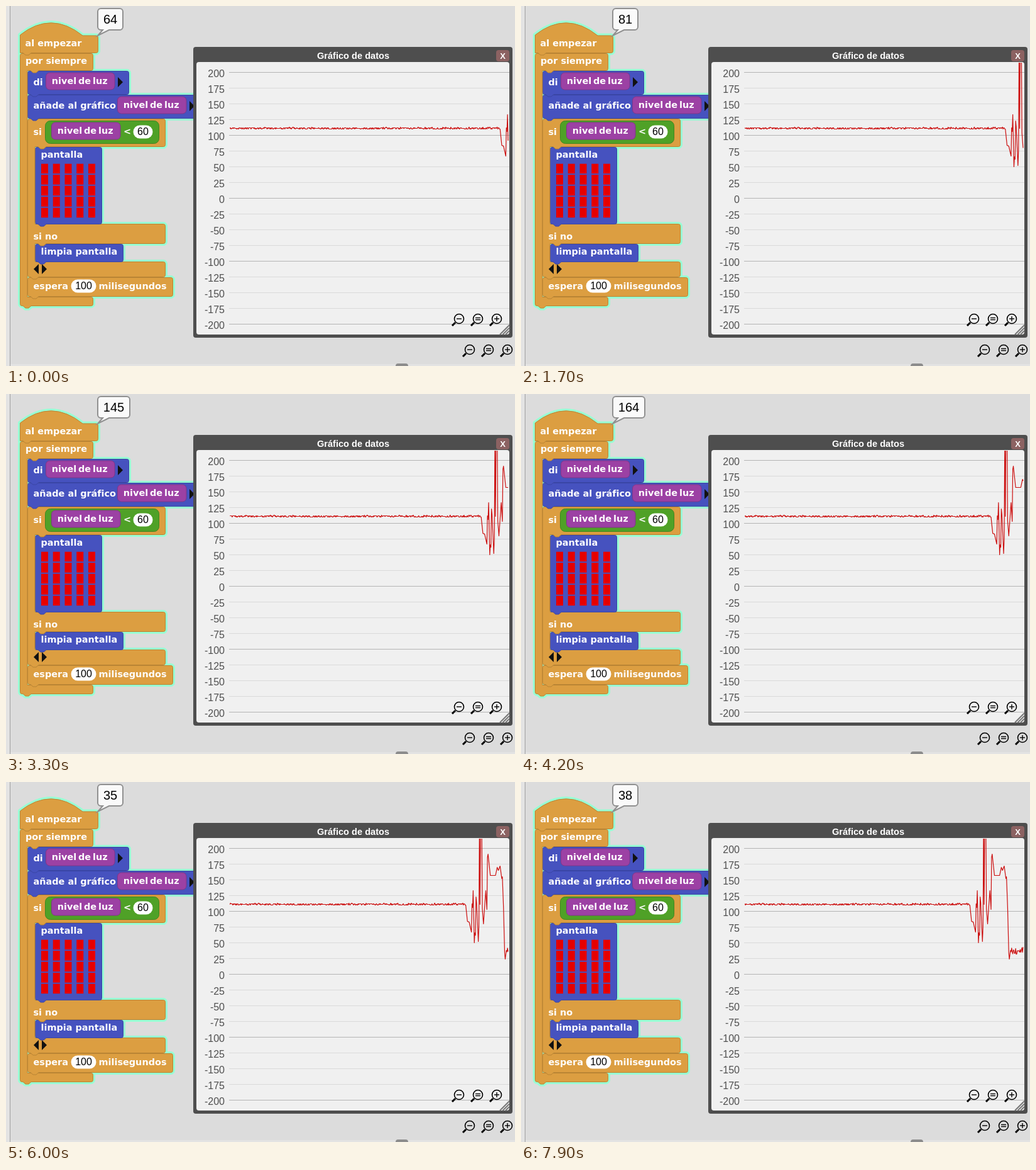
These frames come from a looping animation (810x572 px, 8 s). An HTML page with a canvas:

```html
<!DOCTYPE html>
<html lang="es">
<head>
<meta charset="utf-8">
<title>Gráfico de datos</title>
<style>
html, body { margin: 0; width: 100%; height: 100%; overflow: hidden; background: #dcdcdc; }
canvas { display: block; }
</style>
</head>
<body>
<canvas id="stage" width="810" height="572"></canvas>
<script>
const ctx = document.getElementById('stage').getContext('2d');
const LOOP = 8000, STEP = 100, DX = 0.911;
const ORANGE = ['#dc9e41', '#b98434'], BLUE = ['#4652bf', '#3a46a5'];
const PURPLE = ['#9c41a4', '#803588'], GREEN = ['#4fa127', '#418520'];
const GLOW = '#98ffd4';
const SANS = '"Liberation Sans", Arial, sans-serif';
const LABEL = 'bold 14.45px "DejaVu Sans", sans-serif';
const PLAIN = '16px ' + SANS;

// Turning points of the light level: [step, value].
const level = [
  [-14, 110], [-11, 84], [-8, 83], [-4, 67], [-3, 112], [-2, 106], [-1, 133],
  [1, 50], [2, 66], [3, 62], [4, 123], [5, 114], [8, 52], [9, 75],
  [10, 240], [11, 111], [12, 240], [14, 236], [15, 104], [17, 80],
  [21, 133], [23, 103], [24, 186], [25, 191], [29, 157], [38, 157], [41, 170],
  [43, 165], [46, 172], [49, 152], [50, 155], [52, 106], [54, 34], [55, 24], [57, 38]
];
// The bubble takes its own, slower readings.
const speech = [
  [0, 64], [2, 60], [4, 118], [10, 22], [11, 230], [14, 236], [17, 81], [21, 130],
  [23, 101], [25, 188], [33, 145], [46, 172], [50, 152], [52, 94], [55, 30], [68, 44], [79, 38]
];

function along(track, x) {
  const i = track.findIndex(p => p[0] >= x);
  if (i < 0) return track[track.length - 1][1];
  if (i === 0) return track[0][1];
  const [x0, y0] = track[i - 1], [x1, y1] = track[i];
  return y0 + (y1 - y0) * (x - x0) / (x1 - x0);
}

function random(n) {
  const s = Math.sin(n * 127.1 + 11.7) * 43758.5453;
  return s - Math.floor(s);
}

function reading(j) {
  const jitter = random(j) - 0.5;
  if (j < -14) return Math.round(111.2 + 3 * jitter);
  return along(level, j) + (j > 57 ? 13 * jitter : 0);
}

function text(s, x, y, font, color = '#fff', align = 'left') {
  ctx.font = font;
  ctx.fillStyle = color;
  ctx.textAlign = align;
  ctx.fillText(s, x, y);
}

function label(s, x, y) { text(s, x, y, LABEL); }

function poly(points, color) {
  ctx.beginPath();
  points.forEach(([x, y]) => ctx.lineTo(x, y));
  ctx.fillStyle = color;
  ctx.fill();
}

// Triangle with its base at x; a negative w points it left.
function arrow(x, y, w) {
  poly([[x, y - 8], [x + w, y], [x, y + 8]], '#111');
}

function line(x1, y1, x2, y2) {
  ctx.beginPath();
  ctx.moveTo(x1, y1);
  ctx.lineTo(x2, y2);
  ctx.stroke();
}

function paint([fill, edge]) {
  ctx.fillStyle = fill;
  ctx.fill();
  if (!edge) return;
  ctx.strokeStyle = edge;
  ctx.lineWidth = 1;
  ctx.stroke();
}

function pill(x, y, w, h, r, ...colors) {
  ctx.beginPath();
  ctx.roundRect(x, y, w, h, r);
  paint(colors);
}

// Lower edge from right to left, with a tab hanging from it.
function tabEdge(tab, bottom) {
  ctx.lineTo(tab + 13, bottom);
  ctx.lineTo(tab + 9, bottom + 3.5);
  ctx.lineTo(tab + 4, bottom + 3.5);
  ctx.lineTo(tab, bottom);
}

function blockPath(x, y, right, bottom, tab) {
  const r = 3;
  ctx.beginPath();
  ctx.moveTo(x + r, y);
  ctx.arcTo(right, y, right, bottom, r);
  ctx.arcTo(right, bottom, x, bottom, r);
  tabEdge(tab, bottom);
  ctx.arcTo(x, bottom, x, y, r);
  ctx.arcTo(x, y, right, y, r);
  ctx.closePath();
}

function hatPath() {
  ctx.beginPath();
  ctx.moveTo(22.5, 46);
  ctx.quadraticCurveTo(72, 7, 122, 47);
  ctx.arcTo(146.5, 47, 146.5, 74, 3);
  ctx.arcTo(146.5, 74.5, 22, 74.5, 3);
  tabEdge(27, 74.5);
  ctx.lineTo(22.5, 74.5);
  ctx.closePath();
}

// Bottom to top, so that each tab lies over the next block.
const blocks = [
  [22, 462, 138, 476, ORANGE, 27],
  [34, 431, 265, 461, ORANGE, 39],
  [34, 406, 253, 430, ORANGE, 39],
  [46, 378, 186, 406, BLUE, 51],
  [34, 346, 253, 377, ORANGE, 51],
  [46, 224, 152, 346, BLUE, 51],
  [34, 179, 253, 223, ORANGE, 51],
  [34, 141, 320, 178, BLUE, 39],
  [34, 103, 195, 140, BLUE, 39],
  [22, 75, 138, 102, ORANGE, 39]
];
// Arms that join the parts of the two loops.
const arms = [[22, 99, 466], [34, 220, 350], [34, 374, 410]];

function shapes() {
  ctx.strokeStyle = GLOW;
  ctx.lineWidth = 7;
  ctx.lineJoin = 'round';
  hatPath();
  ctx.stroke();
  for (const [x, y, r, b, , tab] of blocks) {
    blockPath(x + 0.5, y + 0.5, r + 0.5, b + 0.5, tab);
    ctx.stroke();
  }
  arms.forEach(([x, top, bottom]) => ctx.strokeRect(x + 0.5, top, 11.5, bottom - top));
  ctx.lineJoin = 'miter';

  for (const [x, y, r, b, colors, tab] of blocks) {
    blockPath(x + 0.5, y + 0.5, r + 0.5, b + 0.5, tab);
    paint(colors);
  }
  for (const [x, top, bottom] of arms) {
    const h = bottom - top;
    ctx.fillStyle = ORANGE[0];
    ctx.fillRect(x + 0.5, top, 11.5, h);
    ctx.fillStyle = ORANGE[1];
    ctx.fillRect(x, top, 1, h);
    ctx.fillRect(x + 11.5, top + 4, 1, h - 8);
  }
  hatPath();
  paint(ORANGE);
}

function sensor(x, cy) {
  pill(x + 0.5, cy - 13.5, 109.5, 27, 6, ...PURPLE);
  ctx.wordSpacing = '-2.2px';
  label('nivel de luz', x + 9.8, cy + 4.5);
  ctx.wordSpacing = '0px';
}

function input(n, cx, cy, w) {
  pill(cx - w / 2, cy - 10.5, w, 21, 10.5, '#fff');
  text(n, cx, cy + 5, PLAIN, '#000', 'center');
}

function script() {
  shapes();
  label('al empezar', 30.5, 64);
  label('por siempre', 31, 92);
  label('di', 43.5, 126);
  sensor(63, 119.5);
  arrow(178, 121, 8);
  label('añade al gráfico', 43.5, 163);
  sensor(177, 157.5);
  arrow(292, 159, 8);
  label('si', 43.5, 205);
  pill(62.5, 182.5, 181, 36, 8, ...GREEN);
  sensor(72, 198.5);
  label('<', 187, 204);
  input('60', 218, 200, 31);

  label('pantalla', 55.5, 241);
  ctx.fillStyle = '#e60000';
  for (let row = 0; row < 5; row++) {
    for (let col = 0; col < 5; col++) {
      ctx.fillRect(56 + col * 18.75, 250.7 + row * 17.5, 11, 15.5);
    }
  }
  label('si no', 43.5, 371);
  label('limpia pantalla', 55.5, 395);
  arrow(52, 418, -8);
  arrow(57, 418, 8);
  label('espera', 43.5, 450);
  input('100', 123.5, 445, 40);
  label('milisegundos', 147.5, 450);
}

function bubble(n) {
  const w = n > 99 ? 51 : 40, l = 146, r = l + w, t = 4, b = 38, c = 5;
  ctx.beginPath();
  ctx.moveTo(l + c, t);
  ctx.arcTo(r, t, r, b, c);
  ctx.arcTo(r, b, l, b, c);
  ctx.lineTo(164, b);
  ctx.lineTo(146, 47);
  ctx.lineTo(154, b);
  ctx.arcTo(l, b, l, t, c);
  ctx.arcTo(l, t, r, t, c);
  ctx.closePath();
  ctx.fillStyle = '#fafafa';
  ctx.fill();
  ctx.strokeStyle = '#909090';
  ctx.lineWidth = 2;
  ctx.stroke();
  text(n, l + w / 2, 28, '20px ' + SANS, '#000', 'center');
}

function lens(x, y, sign) {
  ctx.strokeStyle = '#000';
  ctx.lineWidth = 3;
  line(x - 6, y + 6, x - 11, y + 11);
  ctx.lineWidth = 1.6;
  ctx.beginPath();
  ctx.arc(x, y, 7.5, 0, Math.PI * 2);
  ctx.stroke();
  ctx.lineWidth = 1.4;
  const gap = sign === '=' ? 1.5 : 0;
  line(x - 4, y - gap, x + 4, y - gap);
  if (gap) line(x - 4, y + gap, x + 4, y + gap);
  if (sign === '+') line(x, y - 4, x, y + 4);
}

function lenses(x, y) {
  ['-', '=', '+'].forEach((sign, i) => lens(x + i * 30, y, sign));
}

function trace(k) {
  ctx.save();
  ctx.beginPath();
  ctx.rect(355, 90, 446, 431);
  ctx.clip();
  ctx.beginPath();
  for (let j = k - 486; j <= k; j++) {
    ctx.lineTo(799 - (k - j) * DX, 305.5 - reading(j));
  }
  ctx.strokeStyle = '#cc1010';
  ctx.lineWidth = 1.2;
  ctx.lineJoin = 'round';
  ctx.stroke();
  ctx.restore();
}

function graph(k) {
  pill(298, 65, 508, 462, 4, '#4e4e4e');
  pill(303, 89, 498, 433, 4, '#f0f0f0');
  text('Gráfico de datos', 552.5, 84, `bold 14.6px ${SANS}`, '#fff', 'center');
  pill(780, 70, 21, 18, 4, '#8c6262');
  text('X', 790.5, 83.5, `bold 13px ${SANS}`, '#fff', 'center');
  for (let v = 200; v >= -200; v -= 25) {
    ctx.fillStyle = v % 100 ? '#dadada' : '#b4b4b4';
    ctx.fillRect(355, 305 - v, 446, 1);
    text(v, 348, 312.5 - v, PLAIN, '#505050', 'right');
  }
  trace(k);
  lenses(721, 497);
  ctx.strokeStyle = '#777';
  ctx.lineWidth = 2;
  [0, 4.5, 9].forEach(d => line(786 + d, 522, 801, 507 + d));
}

function draw(k) {
  ctx.fillStyle = '#dcdcdc';
  ctx.fillRect(0, 0, 810, 572);
  ctx.fillStyle = '#e3e3e3';
  ctx.fillRect(0, 0, 6, 572);
  ctx.fillRect(7, 569, 803, 3);
  ctx.fillStyle = '#a0a0a0';
  ctx.fillRect(6, 0, 1, 572);
  pill(620, 568, 20, 10, 4, '#8c8c8c');
  script();
  bubble(Math.round(along(speech, k)));
  graph(k);
  lenses(738, 546);
}

const start = performance.now();
function tick() {
  draw(Math.floor(((performance.now() - start) % LOOP) / STEP));
  requestAnimationFrame(tick);
}
tick();
</script>
</body>
</html>
```
